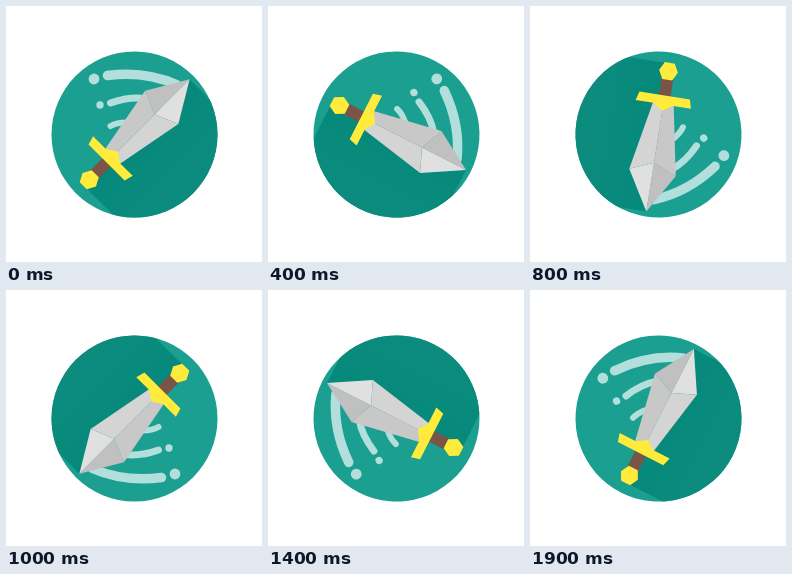
These frames come from a looping animation (256x256 px, 2 s). An HTML page:

```html
<!DOCTYPE html>
<html lang="en">
<head>
<meta charset="utf-8">
<title>Spinning sword</title>
<style>
  html, body { margin: 0; height: 100%; overflow: hidden; background: #fff; }
  svg { display: block; width: 100vw; height: 100vh; }
</style>
</head>
<body>
<svg viewBox="-128.5 -128.5 256 256">
  <defs>
    <clipPath id="disc"><circle r="83"/></clipPath>
    <linearGradient id="shade" gradientUnits="userSpaceOnUse" x1="0" x2="83">
      <stop stop-color="#05897a"/>
      <stop offset="1" stop-color="#0d8c7e"/>
    </linearGradient>
  </defs>
  <g id="badge">
    <circle r="83" fill="#1a9f91"/>
    <g clip-path="url(#disc)">
      <path transform="rotate(45)" fill="url(#shade)" d="M0-78H90V72H0Z"/>
    </g>

    <g fill="none" stroke="#b2dfdb" stroke-linecap="round">
      <path stroke-width="9.5" d="M-27-59Q10-64 42-50"/>
      <path stroke-width="7" d="M-24-31.5Q-6-38 10-36"/>
      <path stroke-width="6" d="M-24-8.5Q-18-12-8-12"/>
    </g>
    <g fill="#b2dfdb">
      <circle cx="-40.5" cy="-55.5" r="5.4"/>
      <circle cx="-34.5" cy="-29.5" r="3.7"/>
    </g>

    <g transform="rotate(45)">
      <path fill="#795548" d="M-6 38H6V58H-6Z"/>
      <path fill="#c0c0c0" d="M0-78L-23.5-38.5L0-28.5Z"/>
      <path fill="#e0e0e0" d="M0-78L23.5-38.5L0-28.5Z"/>
      <path fill="#c8c8c8" d="M-23.5-38.5L0-28.5V31H-10.5Z"/>
      <path fill="#d4d4d4" d="M23.5-38.5L0-28.5V31H10.5Z"/>
      <path fill="#ffeb3b" d="M-28 30.5H-10L0 24L10 30.5H28L25.5 39.5H-25.5Z"/>
      <path fill="#ffeb3b" d="M-9.5 64L-5 55.5H5L9.5 64L5 72.5H-5Z"/>
    </g>
  </g>
</svg>
<script>
  const LOOP = 2000, STEP = 100;
  const badge = document.getElementById('badge');
  const start = performance.now();

  // One full turn per loop, advancing in hard 18 degree steps.
  function draw() {
    const time = (performance.now() - start) % LOOP;
    const angle = Math.floor(time / STEP) * 360 * STEP / LOOP;
    badge.setAttribute('transform', `rotate(${angle})`);
    requestAnimationFrame(draw);
  }
  draw();
</script>
</body>
</html>
```
